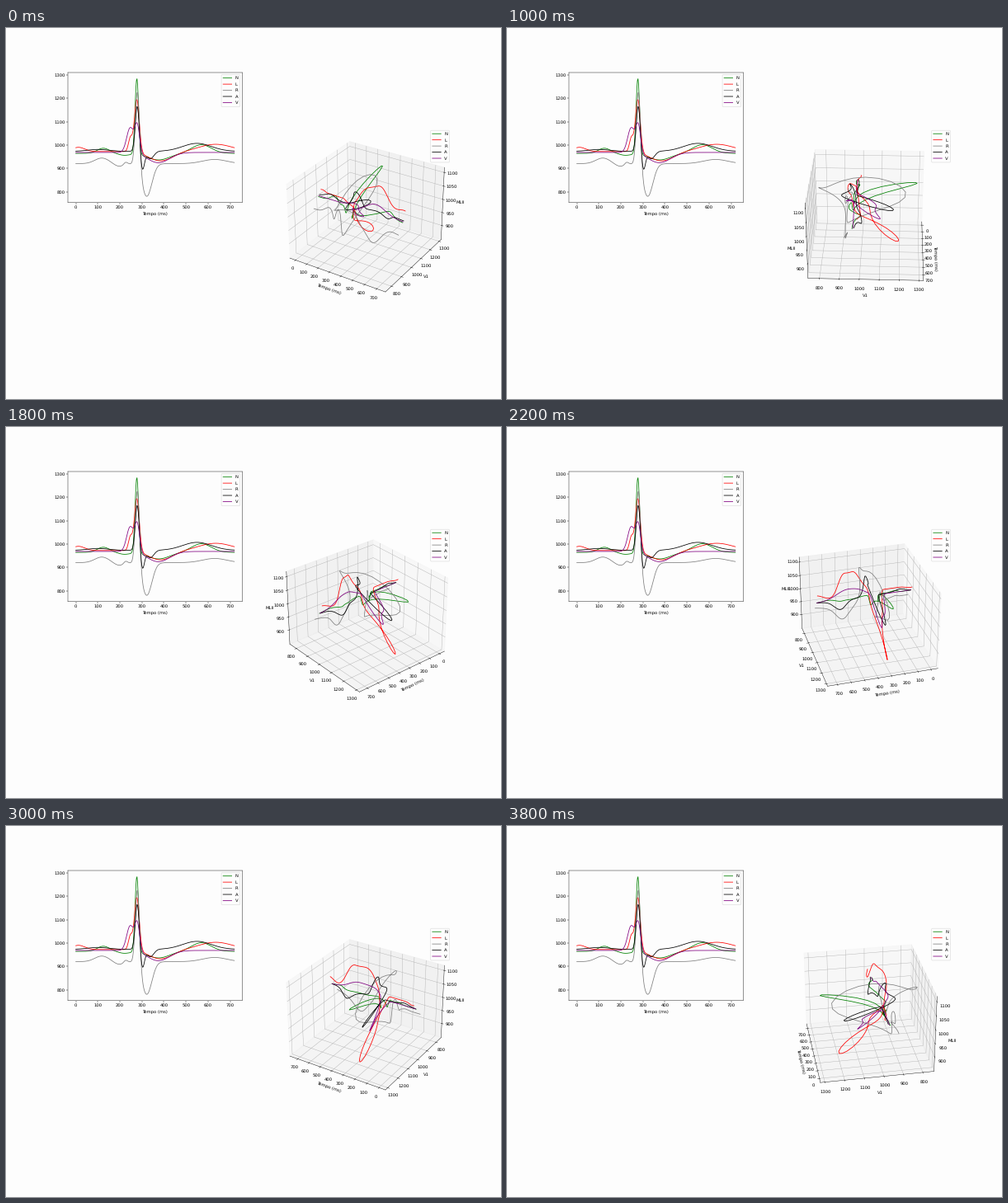
Recreate the animation shown at these times as a matplotlib script. Size 600 by 450 pixels, loop 3900 ms.

```python
import numpy as np
import matplotlib.pyplot as plt
from matplotlib.animation import FuncAnimation

PAPER = "#fdfdfd"
plt.rcParams.update({
    "font.family": "DejaVu Sans",
    "text.hinting": "none",
    "path.snap": False,
    "figure.facecolor": PAPER,
    "axes.facecolor": PAPER,
})

FRAMES, INTERVAL = 39, 100
START_AZIM, STEP = -58, 6
TIME = np.arange(260) / 0.36  # 360 samples per second, in ms


def lead(base, *waves):
    """Heartbeat as a baseline plus bell-shaped waves (centre, height, width)."""
    return base + sum(height * np.exp(-((TIME - centre) / width) ** 2 / 2)
                      for centre, height, width in waves)


fig = plt.figure(figsize=(16, 12), dpi=37.5)
flat = fig.add_subplot(2, 2, 1)
space = fig.add_subplot(1, 2, 2, projection="3d")


def beat(label, color, v1, mlii):
    flat.plot(TIME, v1, color=color, label=label)
    space.plot(TIME, v1, mlii, color=color, label=label)


beat("N", "green",
     v1=lead(964, (125, 22, 28), (220, -8, 25), (277, 326, 8),
             (375, -28, 50), (570, 37, 45)),
     mlii=lead(1016, (130, 14, 28), (248, -28, 8), (275, 62, 10),
               (303, -38, 9), (400, -10, 50), (600, 12, 50)))

beat("L", "red",
     v1=lead(972, (12, 18, 28), (248, 60, 9), (277, 229, 11),
             (385, -40, 55), (635, 31, 75)),
     mlii=lead(1036, (250, -45, 12), (273, -163, 11), (298, -70, 14),
               (435, 66, 50), (530, 66, 42), (720, 15, 50)))

beat("R", "gray",
     v1=lead(920, (118, 24, 32), (195, -12, 22), (226, 10, 8),
             (280, 334, 9.5), (322, -140, 23), (630, 18, 55)),
     mlii=lead(984, (110, 12, 25), (183, -12, 13), (217, 26, 11),
               (254, -78, 13), (290, 65, 8), (325, 80, 35), (510, -57, 55)))

beat("A", "black",
     v1=lead(973, (100, 8, 45), (279, 196, 9), (302, -80, 9),
             (338, -32, 16), (550, 34, 65)),
     mlii=lead(1020, (90, 12, 40), (282, -50, 9), (343, 64, 23),
               (558, -24, 38)))

beat("V", "purple",
     v1=lead(968, (247, 107, 16), (279, 118, 11), (375, -44, 50)),
     mlii=lead(1018, (250, -35, 15), (280, -75, 13), (490, 34, 80)))

times, levels = range(0, 800, 100), range(800, 1400, 100)

flat.set(xlim=(-36, 755.4), ylim=(754.2, 1310.3), xticks=times, yticks=levels)
flat.set_xlabel("Tempo (ms)", labelpad=6)

space.set(xticks=times, yticks=levels, zticks=range(900, 1150, 50))
space.set(xlim=(-52.5, 772), ylim=(742.6, 1321.9), zlim=(845, 1118.5),
          xlabel="Tempo (ms)", ylabel="V1", zlabel="MLII")

for ax in (flat, space):
    ax.legend(loc="upper right")


def update(i):
    space.view_init(elev=30, azim=START_AZIM + STEP * i)
    return []


anim = FuncAnimation(fig, update, frames=FRAMES, interval=INTERVAL,
                     init_func=lambda: update(0), repeat=True, repeat_delay=0)
plt.show()
```
